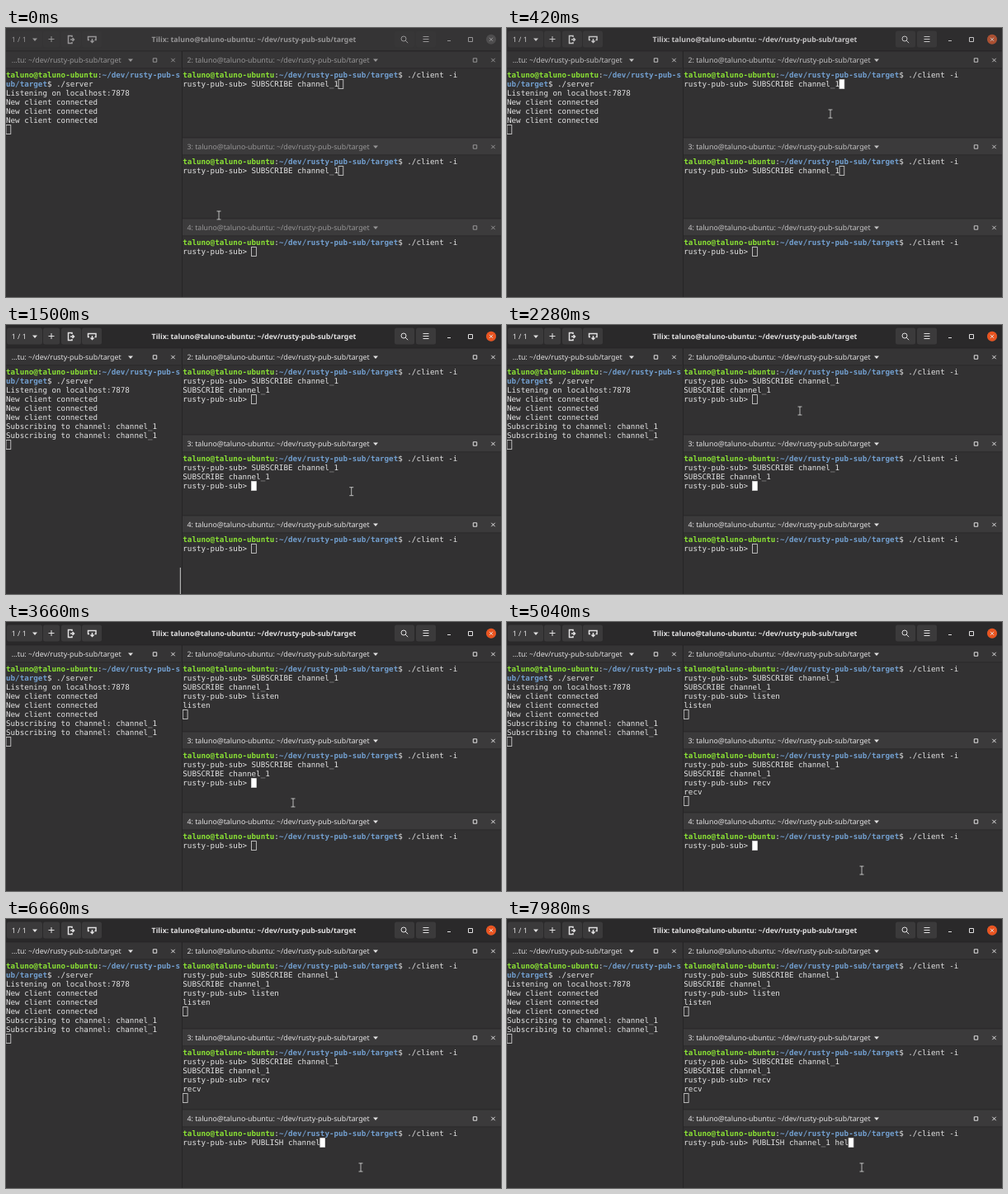
Recreate the animation shown at these times as an HTML page. Size 600x326 px, loop 8000 ms.

```html
<!DOCTYPE html>
<html lang="en">
<head>
<meta charset="utf-8">
<title>Terminal session</title>
<style>
html, body { margin: 0; width: 100%; height: 100%; overflow: hidden; background: #323132; }
svg { display: block; width: 600px; height: 326px; }
text { white-space: pre; text-rendering: geometricPrecision; }
.ui { font: 8.8px "Noto Sans", "Open Sans", sans-serif; fill: var(--label); }
.title { font-weight: 700; font-size: 8.75px; }
.mono { font: 9.22px "DejaVu Sans Mono", monospace; fill: #e2e2e2; }
.user { font-weight: 700; fill: #8ae234; }
.path { font-weight: 700; fill: #729fcf; }
.icon { fill: none; stroke: var(--label); stroke-width: 1; }
.bold { stroke-width: 1.5; }
.solid { fill: var(--label); }
.button { fill: var(--button); }
.bar { fill: var(--bar); }
.head { fill: var(--head); }
.line { fill: #262526; }
</style>
</head>
<body>
<svg id="stage" viewBox="0 0 600 326"></svg>
<script>
const LOOP = 8000, TICK = 60, CELL = 5.55, ROW = 11;
const USER = 'taluno@taluno-ubuntu', DIR = '~/dev/rusty-pub-sub/target';
const PROMPT = 'rusty-pub-sub> ', JOIN = 'SUBSCRIBE channel_1';
const stage = document.getElementById('stage');

function add(tag, attrs = {}, text = '', parent = stage) {
  const node = document.createElementNS('http://www.w3.org/2000/svg', tag);
  for (const key in attrs) node.setAttribute(key, attrs[key]);
  node.textContent = text;
  return parent.appendChild(node);
}
const rect = (cls, x, y, width, height, rx = 0) => add('rect', { class: cls, x, y, width, height, rx });
const icon = (d, cls = '') => add('path', { class: 'icon ' + cls, d });
const label = (x, y, text, cls = 'ui') => add('text', { class: cls, x, y }, text);
const caret = (x, y) => add('path', { class: 'solid', d: `M${x - 3} ${y - 1.5}h6l-3 3.5z` });
const square = (x, y, r) => icon(`M${x - r} ${y - r}h${2 * r}v${2 * r}h${-2 * r}z`);
const cross = (x, y, r) => icon(`M${x - r} ${y - r}l${2 * r} ${2 * r}m0 ${-2 * r}l${-2 * r} ${2 * r}`);
const clamp = v => Math.max(0, Math.min(1, v));

function titleBar() {
  rect('bar', 0, 0, 600, 28);
  rect('line', 0, 27.5, 600, 1);
  for (const x of [45, 67, 92, 471, 497]) rect('button', x, 3.5, x === 45 ? 20 : 24, 20, 2.5);
  rect('button', 1, 3.5, 43, 20, 2.5);
  label(6.8, 17, '1 / 1');
  caret(35, 14);
  icon('M51.5 13.5h7m-3.5-3.5v7');
  icon('M80 11v-1.5h-4.5v9h4.5v-1.5m-2-3h4m-1.5-2l2 2l-2 2', 'bold');
  icon('M101 14.5h-1.5v-4h9.5v4h-1.5m-3-1.5v4m-2-1.5l2 2l2-2', 'bold');
  add('text', { class: 'ui title', x: 300.5, y: 17, 'text-anchor': 'middle' }, `Tilix: ${USER}: ${DIR}`);
  add('circle', { class: 'icon', cx: 482, cy: 13, r: 3 });
  icon('M484.2 15.2l3 3');
  icon('M505.5 10.5h7m-7 3h7m-7 3h7');
  icon('M535 15.5h4');
  square(563, 14, 2.5);
  const disc = fill => add('circle', { cx: 588, cy: 13.8, r: 6, fill });
  disc('#4e4d4e');
  const close = disc('#e95420');
  cross(588, 13.8, 2);
  return close;
}

function paneHeader(x, y, width, text, textX, caretX) {
  rect('head', x, y, width, 20.5);
  if (y > 100) rect('', x, y, width, 20.5).style.fill = '#ffffff08';
  rect('line', x, y + 20, width, .7);
  label(textX, y + 13, text);
  caret(caretX, y + 10.5);
  square(x + width - 31.5, y + 10.5, 2.2);
  cross(x + width - 9.5, y + 10.5, 2.2);
}

function spans(x, y, parts) {
  const line = add('text', { class: 'mono', x, y });
  for (const [cls, text] of parts) add('tspan', { class: cls }, text, line);
}

function terminal(x, top) {
  const lines = Array.from({ length: 7 }, (_, i) => label(x, top + 8.6 + i * ROW, '', 'mono'));
  const cursor = add('rect', { width: 5.8, height: 10.8, stroke: '#dcdcdc', 'stroke-width': .8 });
  return (content, focused) => {
    const texts = content.split('\n'), last = texts.length - 1;
    lines.forEach((line, i) => { line.textContent = texts[i] || ''; });
    cursor.setAttribute('x', x + texts[last].length * CELL);
    cursor.setAttribute('y', top + last * ROW + .2);
    cursor.setAttribute('fill', focused ? '#fff' : 'none');
  };
}

// Bursts of keys, one key per tick; Enter echoes the command, \b erases
function session(bursts, t) {
  let done = PROMPT, command = '';
  for (const [start, keys] of bursts) {
    const count = Math.max(0, Math.floor((t - start) / TICK));
    for (const key of keys.slice(0, count)) {
      if (key === '\b') command = command.slice(0, -1);
      else if (key === '\n') {
        done += `${command}\n${command}\n` + (command === JOIN ? PROMPT : '');
        command = '';
      } else command += key;
    }
  }
  return done + command;
}

const clients = [
  { id: 2, y: 28.5, keys: [[-LOOP, JOIN], [420, '\n'], [2700, 'listen'], [3300, '\n']] },
  { id: 3, y: 133.5, keys: [[-LOOP, JOIN], [1140, '\n'], [3780, 're'], [4140, 'cv\n']] },
  { id: 4, y: 231.5, keys: [[5340, 'PUBLISH '], [6000, 'chanel\b\bnel'], [6780, '_'],
    [7020, '1 h'], [7440, 'el'], [7800, 'l\b']] }
];

// Pointer stops; a stop with a pane clicks it one tick later
const stops = [
  { time: 0, x: 258, y: 227 },
  { time: 300, x: 392, y: 104, pane: 2 },
  { time: 840, x: 426, y: 174, pane: 3 },
  { time: 1740, x: 398, y: 281 },
  { time: 1860, x: 389, y: 196 },
  { time: 2280, x: 355, y: 104, pane: 2 },
  { time: 3600, x: 348, y: 219, pane: 3 },
  { time: 4980, x: 430, y: 301, pane: 4 }
];

function pointerAt(t) {
  const next = stops.findIndex(stop => stop.time > t);
  if (next < 0) return stops[stops.length - 1];
  const from = stops[next - 1], to = stops[next];
  const k = clamp(1 - (to.time - t) / Math.min(360, to.time - from.time));
  const ease = k * k * (3 - 2 * k);
  return { x: from.x + (to.x - from.x) * ease, y: from.y + (to.y - from.y) * ease };
}

// Window
rect('', 0, 0, 600, 326).style.fill = '#323132';
const close = titleBar();
paneHeader(0, 28.5, 212, '…tu: ' + DIR, 6.8, 151);
for (const client of clients) {
  const { id, y } = client;
  rect('line', 214, y - 1, 386, 1);
  paneHeader(214, y, 386, `${id}: ${USER}: ${DIR}`, 219.5, 448);
  spans(214.3, y + 31.5, [['user', USER], ['', ':'], ['path', DIR], ['', '$ ./client -i']]);
  client.show = terminal(214.3, y + 33.9);
}
rect('line', 213, 28, 1, 298);
spans(0, 60, [['user', USER], ['', ':'], ['path', DIR.slice(0, 17)]]);
spans(0, 71, [['path', DIR.slice(17)], ['', '$ ./server']]);
const showServer = terminal(0, 73.4);
const scrollbar = rect('', 210.8, 294, 1.2, 32);
scrollbar.style.fill = '#b0b0b0';

const pointer = add('g', { fill: 'none' });
for (const [stroke, width] of [['#222', 1.8], ['#dcdcdc', .9]])
  add('path', { d: 'M-2.5 -5h5M0 -5v10M-2.5 5h5', stroke, 'stroke-width': width }, '', pointer);

// Grey levels of the unfocused and the focused window
const tones = { bar: [53, 42], head: [54, 53], label: [150, 226], button: [55, 59] };

function draw(time) {
  const t = Math.floor(time / TICK) * TICK;
  const active = clamp((t - 300) / 200);
  for (const name in tones) {
    const [from, to] = tones[name], level = Math.round(from + (to - from) * active);
    stage.style.setProperty('--' + name, `rgb(${level},${level - 1},${level})`);
  }
  close.style.opacity = active;

  const clicks = stops.filter(stop => stop.pane && t >= stop.time + TICK);
  const focused = clicks.length ? clicks[clicks.length - 1].pane : 0;
  let log = 'Listening on localhost:7878\n' + 'New client connected\n'.repeat(3);
  for (const { id, keys, show } of clients) {
    const content = session(keys, t);
    show(content, id === focused);
    if (content.includes('\n' + JOIN)) log += 'Subscribing to channel: channel_1\n';
  }
  showServer(log, false);

  scrollbar.style.opacity = clamp((t - 480) / 120) * clamp((1740 - t) / 240);
  const { x, y } = pointerAt(t);
  pointer.setAttribute('transform', `translate(${x} ${y})`);
}

function tick() {
  draw(performance.now() % LOOP);
  requestAnimationFrame(tick);
}
tick();
</script>
</body>
</html>
```
